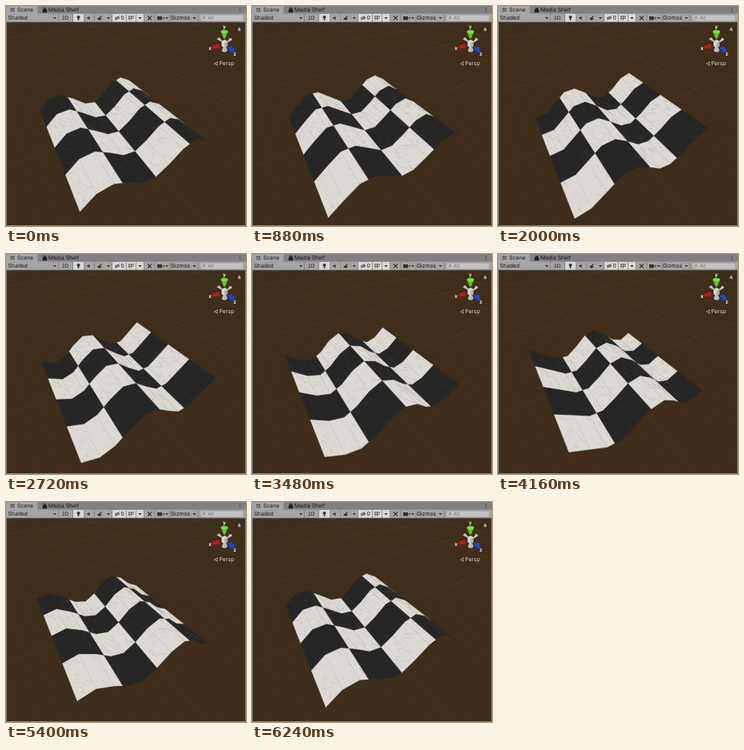
An HTML page with a canvas for the animation above (6280 ms loop, 300x275 px).

```html
<!DOCTYPE html>
<html lang="en">
<head>
<meta charset="utf-8">
<title>Waving plane</title>
<style>
html, body { margin: 0; width: 100%; height: 100%; overflow: hidden; background: #3d2d1a; }
canvas, svg { position: absolute; left: 0; top: 0; width: 300px; height: 275px; display: block; }
text { font-family: Inter, "Liberation Sans", sans-serif; font-size: 6.8px; fill: #141414; text-rendering: geometricPrecision; }
.small { font-size: 6.2px; }
.axis { font-size: 6.5px; font-weight: 600; fill: #fff; text-anchor: middle; }
</style>
</head>
<body>
<canvas id="stage" width="300" height="275"></canvas>
<svg viewBox="0 0 300 275">
  <defs><path id="drop" d="M-2-1H2L0 1.5Z" fill="#333"/></defs>

  <!-- tabs -->
  <rect width="300" height="10" fill="#828081"/>
  <rect width="39.5" height="10" fill="#a5a4a4"/>
  <path d="M6.7 2V7.5M9.3 2V7.5M5.2 3.5H10.800M5.200 6H10.800" stroke="#444" stroke-width=".7"/>
  <text x="14" y="7.300">Scene</text>
  <path d="M46 4H51V8H46ZM47.200 4V2.500H49.800V4" fill="#222" stroke="#222" stroke-width=".5"/>
  <text x="53" y="7.300">Media Shelf</text>
  <path d="M292.500 2V7.500" stroke="#333" stroke-width="1.100" stroke-dasharray="1.100 1.100"/>

  <!-- toolbar -->
  <rect y="9.500" width="300" height="10.500" fill="#a5a4a4"/>
  <g fill="#d9d8d8">
    <rect x="84" y="10" width="13.500" height="10"/>
    <rect x="133" y="10" width="17" height="10"/>
    <rect x="150.500" y="10" width="21.500" height="10"/>
  </g>
  <path d="M65.500 10V20M83.500 10V20M97.800 10V20M110.500 10V20M132.500 10V20M150.300 10V20M162.500 10V20M172.500 10V20M186 10V20M205 10V20M240 10V20M0 20H300" stroke="#7d7c7c" stroke-width=".7"/>
  <text x="2.500" y="17.300">Shaded</text>
  <text x="70" y="17" class="small">2D</text>
  <g fill="#333">
    <circle cx="90.500" cy="14" r="2"/><rect x="89.700" y="16" width="1.600" height="2"/>
    <path d="M101.500 14H103L104.500 12.500V17.500L103 16H101.500Z"/>
    <path d="M114 16L117 13.800L120 16L117 17.800Z"/><circle cx="118.500" cy="13.200" r=".9"/>
    <path d="M189 13H195V17.500H189ZM195.500 15L197.500 13.500V17Z"/>
  </g>
  <path d="M136 15Q139 12 142 15Q139 18 136 15ZM136.500 17.800L141.500 12.200" fill="none" stroke="#333" stroke-width=".8"/>
  <text x="143.500" y="17.300">0</text>
  <path d="M152.500 13H159.500M152.500 15.500H159.500M154 12V18M156.500 12V18M159 12V15" stroke="#444" stroke-width=".7"/>
  <path d="M177 12.500L182 17.500M182 12.500L177 17.500" stroke="#333" stroke-width="1.100"/>
  <use href="#drop" x="61" y="15"/><use href="#drop" x="128" y="15"/>
  <use href="#drop" x="167.500" y="15"/><use href="#drop" x="201" y="15"/>
  <use href="#drop" x="235.500" y="15"/>
  <text x="206" y="17.300">Gizmos</text>
  <rect x="243" y="11" width="54" height="8" rx="1.500" fill="#c3c2c2" stroke="#858484" stroke-width=".5"/>
  <circle cx="247.500" cy="14.500" r="1.300" fill="none" stroke="#666" stroke-width=".6"/>
  <path d="M246.600 15.500L245.500 16.800" stroke="#666" stroke-width=".6"/>
  <text x="252" y="17" class="small" style="fill:#777">All</text>

  <!-- orientation gizmo -->
  <path d="M263.500 41.500L266.500 39L272 46ZM280 39.500L283 42L275 47Z" fill="#c9c7c3"/>
  <path d="M269.500 56Q273 59.500 277 56L273.500 47Z" fill="#bdbbb7"/>
  <path d="M257.500 50L265.500 47.500Q268 49.500 267 52.500L259 53.500Q257 52 257.500 50Z" fill="#bd1d18"/>
  <path d="M277 52L281.500 50Q285.500 53 286 56.500Q284 59 280.500 57.500Z" fill="#1d46d2"/>
  <path d="M268.500 32Q273 29 277.500 32L274 40.500H272Z" fill="#5cc72c"/>
  <ellipse cx="273" cy="32" rx="4.500" ry="2" fill="#7bdc45"/>
  <path d="M269.500 44L273.300 42L277 44V50L273.300 52.500L269.500 50Z" fill="#d8d6d2"/>
  <path d="M273.300 46.500L277 44V50L273.300 52.500Z" fill="#aaa8a4"/>
  <text x="273" y="28" class="axis">y</text>
  <text x="255" y="54.500" class="axis">x</text>
  <text x="286" y="61.500" class="axis">z</text>
  <path d="M290 28.800H293V31H290ZM290.500 28.800V27.500Q291.500 26.300 292.500 27.500V28.800" fill="#a8a298" stroke="#a8a298" stroke-width=".4"/>
  <path d="M265 69.500L260.500 72L265 74.500M264 70V74" fill="none" stroke="#c8c4bd" stroke-width=".7"/>
  <text x="266.500" y="74.300" style="fill:#dedbd5">Persp</text>

  <!-- window edge -->
  <path d="M.5 20V274.500H299.500V20" fill="none" stroke="#858383"/>
</svg>
<script>
const ctx = document.getElementById('stage').getContext('2d');
const LOOP = 6280, STEP = 40, SIZE = 10, CELL = 2.5;
const DARK = '#262626', LIGHT = '#dcd9d5';

// Perspective camera: u runs left to right, v back to front, h upwards.
function project(u, v, h) {
  const w = 1 + 0.02546 * u - 0.0413 * v - 0.0433 * h;
  return [
    (42.7 + 16.205 * u + 1.154 * v - 6.43 * h) / w,
    (130.3 - 1.174 * u + 2.056 * v - 17.09 * h) / w
  ];
}

// The mesh has one vertex per unit and is flat between them.
function height(u, t) {
  const i = Math.floor(u), f = u - i;
  return Math.sin(i - t) * (1 - f) + Math.sin(i + 1 - t) * f;
}

let seed = 7;
function random() {
  seed = (seed * 1664525 + 1013904223) % 4294967296;
  return seed / 4294967296;
}

const isDark = (u, v) => (Math.floor(u / CELL) + Math.floor(v / CELL)) % 2 === 0;

// Mesh edges plus checker edges, nearest last.
const cuts = [0, 1, 2, 2.5, 3, 4, 5, 6, 7, 7.5, 8, 9, 10];
const strips = cuts.slice(1).map((b, i) => ({ a: cuts[i], b, veins: [] })).reverse();

for (let i = 0; i < 650; i++) {
  const u = random() * SIZE, v = random() * SIZE;
  const angle = 0.7 + random() * 1.1, len = 0.1 + random() * 0.4;
  const strip = strips.find(s => u >= s.a && u < s.b);
  strip.veins.push({
    u, v,
    u2: Math.min(strip.b, u + Math.cos(angle) * len),
    v2: Math.min((Math.floor(v / CELL) + 1) * CELL, v + Math.sin(angle) * len),
    color: isDark(u, v) ? 'rgba(125,125,125,.09)' : 'rgba(135,130,124,.17)'
  });
}

function line(p, q, color, width) {
  ctx.strokeStyle = color;
  ctx.lineWidth = width;
  ctx.beginPath();
  ctx.moveTo(...p);
  ctx.lineTo(...q);
  ctx.stroke();
}

// Grid lines are cut off where they come too close to the camera.
function drawGrid(spacing, reach, color) {
  for (let n = 5 - reach; n <= 5 + reach; n += spacing) {
    const near = (0.9 + 0.02546 * n) / 0.0413;
    const left = (0.0413 * n - 0.9) / 0.02546;
    if (near > -reach) line(project(n, -reach, 0), project(n, near, 0), color, 0.8);
    if (left < reach) line(project(left, n, 0), project(reach, n, 0), color, 0.8);
  }
}

function drawGround() {
  ctx.fillStyle = '#3d2d1a';
  ctx.fillRect(0, 0, 300, 275);
  drawGrid(1, 30, 'rgba(165,140,110,.035)');
  drawGrid(10, 120, 'rgba(165,140,110,.1)');
}

function facing(p) {
  const ax = p[2][0] - p[0][0], ay = p[2][1] - p[0][1];
  const bx = p[3][0] - p[1][0], by = p[3][1] - p[1][1];
  return ax * by - ay * bx > 0;
}

function drawStrip({ a, b, veins }, t) {
  const ha = height(a, t), hb = height(b, t);
  const at = (u, v) => project(u, v, ha + (hb - ha) * (u - a) / (b - a));
  if (!facing([at(a, 0), at(b, 0), at(b, SIZE), at(a, SIZE)])) return;
  for (let v = 0; v < SIZE; v += CELL) {
    const quad = [at(a, v), at(b, v), at(b, v + CELL), at(a, v + CELL)];
    ctx.fillStyle = ctx.strokeStyle = isDark(a, v) ? DARK : LIGHT;
    ctx.lineWidth = 0.4;
    ctx.beginPath();
    quad.forEach(p => ctx.lineTo(...p));
    ctx.closePath();
    ctx.fill();
    ctx.stroke();
  }
  for (const s of veins) line(at(s.u, s.v), at(s.u2, s.v2), s.color, 1);
}

let shown = -1;
const start = performance.now();
function frame() {
  const step = Math.floor(((performance.now() - start) % LOOP) / STEP);
  if (step !== shown) {
    shown = step;
    const t = step * STEP / LOOP * 2 * Math.PI;
    drawGround();
    strips.forEach(s => drawStrip(s, t));
  }
  requestAnimationFrame(frame);
}
frame();
</script>
</body>
</html>
```
